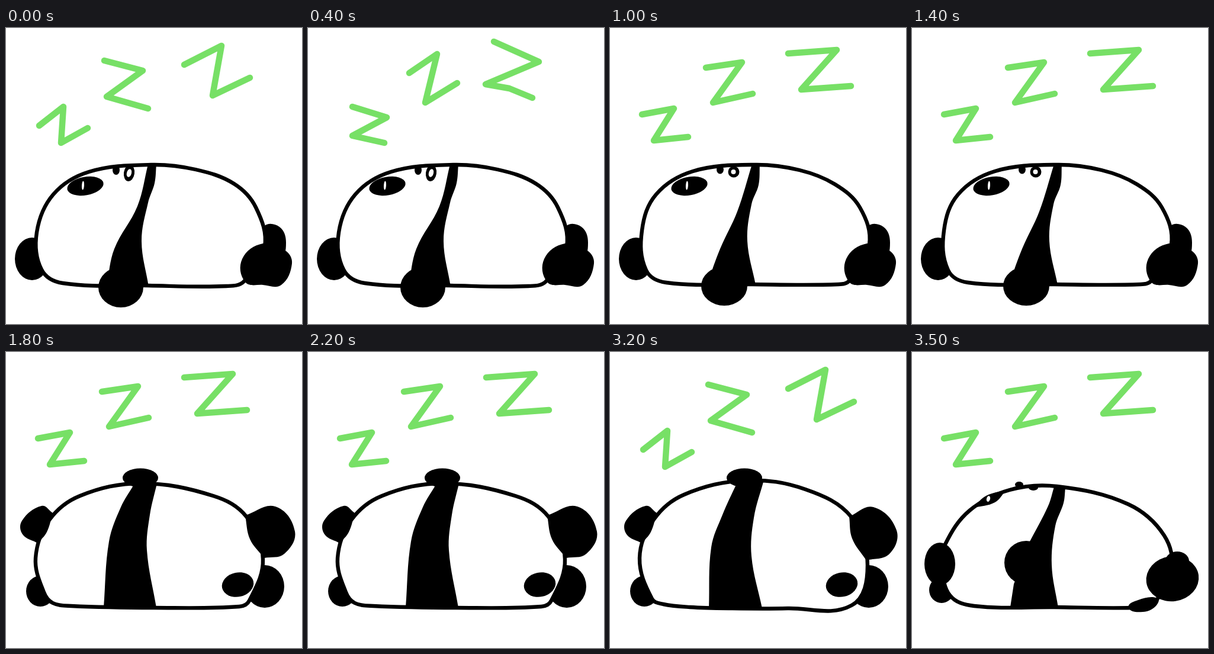
Write an HTML page that moves like this. It is 500 px wide and 500 px high and loops after 3.6 s.

```html
<!DOCTYPE html>
<html lang="en">
<head>
<meta charset="utf-8">
<title>Sleeping panda</title>
<style>
  html, body { margin: 0; width: 100%; height: 100%; overflow: hidden; background: #fff; }
  svg { display: block; width: 100%; height: 100%; }
  .snore { fill: none; stroke: #77e066; stroke-width: 10.5; stroke-linecap: round; stroke-linejoin: round; }
  .body { fill: #fff; stroke: #000; stroke-width: 6.4; }
  .light { fill: #fff; }
</style>
</head>
<body>
<svg id="stage" viewBox="0 0 500 500"></svg>
<script>
const LOOP = 3600, STEP = 200;

// Smooth run through points; handles follow the neighbours' direction.
function smoothRun(points, closed) {
  const n = points.length;
  const at = i => points[closed ? (i + n) % n : Math.max(0, Math.min(n - 1, i))];
  const heading = i => {
    const [x0, y0] = at(i - 1), [x1, y1] = at(i + 1);
    const length = Math.hypot(x1 - x0, y1 - y0) || 1;
    return [(x1 - x0) / length, (y1 - y0) / length];
  };
  let d = points[0].join(' ');
  for (let i = 0; i < (closed ? n : n - 1); i++) {
    const [ax, ay] = at(i), [bx, by] = at(i + 1);
    const reach = 0.36 * Math.hypot(bx - ax, by - ay);
    const [ux, uy] = heading(i), [vx, vy] = heading(i + 1);
    d += `C${ax + ux * reach} ${ay + uy * reach} ${bx - vx * reach} ${by - vy * reach} ${bx} ${by}`;
  }
  return d;
}

// One run makes a smooth closed loop; several runs meet at corners.
function shape(outline, kind = '') {
  const runs = outline.split('|').map(run => run.match(/\S+ \S+/g).map(p => p.split(' ').map(Number)));
  const d = 'M' + runs.map(run => smoothRun(run, runs.length === 1)).join('L') + 'Z';
  return `<path class="${kind}" d="${d}"/>`;
}

const body = outline => shape(outline, 'body');

const blob = (x, y, rx, ry, tilt = 0, kind = '') =>
  `<ellipse class="${kind}" cx="${x}" cy="${y}" rx="${rx}" ry="${ry}" transform="rotate(${tilt} ${x} ${y})"/>`;

const light = (x, y, rx, ry, tilt) => blob(x, y, rx, ry, tilt, 'light');

const zigzags = (...lines) => `<path class="snore" d="${lines.map(line => 'M' + line).join('')}"/>`;

const tilted = zigzags('56 165 97 133 93 194 138 169', '166 55 231 72 170 116 240 136', '301 62 364 30 349 114 412 84');
const wide = zigzags('75 133 133 151 75 182 129 194', '171 76 218 44 198 126 252 93', '314 23 390 57 300 95 340 102 379 118');
const upright = zigzags('54 146 108 136 74 190 132 184', '162 67 223 58 174 126 241 111', '301 43 383 37 323 104 407 98');
const snores = [tilted, upright, wide, upright];

const sideFeet = () =>
  blob(44, 390, 29, 36) + shape('436 335 462 336 473 362 462 390 430 370');

const sideFront = () =>
  shape('404 429 399 390 434 364 472 376 483 398 465 434 434 434') +
  blob(134, 267, 31, 15.5, -10) + light(130, 266, 2, 7.5, 3);

const sideA = sideFeet() +
  body('245 231 140 243 80 281 52 345 60 408 96 431 240 435 372 436 402 428 437 370 422 303 385 263 320 239') +
  shape('240 230 222 301 183 373 170 435|241 437 229 360 240 295 251 262 254 230') +
  blob(194, 438, 38, 34) + sideFront() +
  blob(186, 240, 6, 8) + blob(208, 245, 9, 14, 8) + light(208, 245, 4, 7, 15);

const sideB = sideFeet() +
  body('245 231 140 242 78 281 54 342 61 409 95 430 240 433 386 433 404 427 438 366 422 303 380 264 320 240') +
  shape('240 230 215 310 186 373 165 430|246 434 232 360 239 298 251 265 253 230') +
  blob(193, 436, 39, 33) + sideFront() +
  blob(186, 239, 6, 7.5) + blob(209, 243, 9.5, 9.5) + light(208.5, 243, 4, 4);

const rollLow = blob(50, 402, 21, 22) +
  body('245 227 165 233 97 268 56 325 51 360 64 411 105 429 240 431 372 432 405 427 438 370 426 310 365 257') +
  blob(47, 358, 26, 36) +
  shape('240 228 230 260 199 320|172 392 166 431|247 432 236 360 242 294 256 255 259 230') +
  blob(193, 356, 37, 37) +
  blob(440, 383, 44.5, 38, -8) + blob(448, 353, 20, 16) +
  shape('366 432 382 419 415 416 411 430 390 439') +
  shape('104 262 125 243 159 233|159 233 140 254 104 263') + light(129, 248, 3, 5, 15) +
  blob(181, 224, 7, 5) + blob(205, 229, 8, 5);

const rollHigh = blob(54, 404, 23, 25) + blob(436, 396, 32, 34) +
  body('240 224 130 243 73 288 51 352 66 412 110 430 250 432 380 432 405 426 436 365 425 305 355 250 300 230') +
  blob(47, 322, 28, 35, 10) +
  shape('232 224 211 260 176 355 166 431|250 432 237 330 243 285 257 226') +
  blob(208, 283, 33, 35, 15) + blob(446, 336, 43, 45) + blob(403, 430, 28, 14, -10);

const backFeet = () => blob(58, 404, 24, 26) + blob(437, 396, 33, 36);

const backFront = () =>
  shape('79 272 60 260 27 285 28 308 54 323|54 323 69 304 79 272') +
  blob(227, 212.5, 30, 16) + blob(391.5, 393, 27, 20.5, -12);

const backA = backFeet() +
  body('228 222 125 243 73 284 50 348 64 406 79 424 110 429 250 432 394 430 411 420 434 350 406 278 350 243') +
  shape('216 224 194 262 174 320 165 431|254 432 238 335 243 275 255 222') +
  shape('404 276 455 261 488 303 470 341 436 348|436 348 412 316 404 276') + backFront();

const backB = backFeet() +
  body('230 217 125 241 74 283 50 348 71 417 90 426 135 431 200 433 300 433 408 428 435 360 408 279 330 232') +
  shape('214 222 190 275 171 330 167 433|257 433 239 345 243 280 260 216') +
  shape('404 278 445 262 484 301 472 341 433 352|433 352 409 315 404 278') + backFront();

function poseAt(time) {
  const odd = Math.floor(time / STEP) % 2;
  if (time < 1600) return odd ? sideB : sideA;
  if (time < 1700) return rollLow;
  if (time < 1800) return rollHigh;
  if (time < 3400) return odd ? backA : backB;
  return time < 3500 ? rollHigh : rollLow;
}

const stage = document.getElementById('stage');
let shown = '';

function draw() {
  const time = performance.now() % LOOP;
  const picture = snores[Math.floor(time / STEP) % snores.length] + poseAt(time);
  if (picture !== shown) stage.innerHTML = shown = picture;
  requestAnimationFrame(draw);
}
draw();
</script>
</body>
</html>
```
